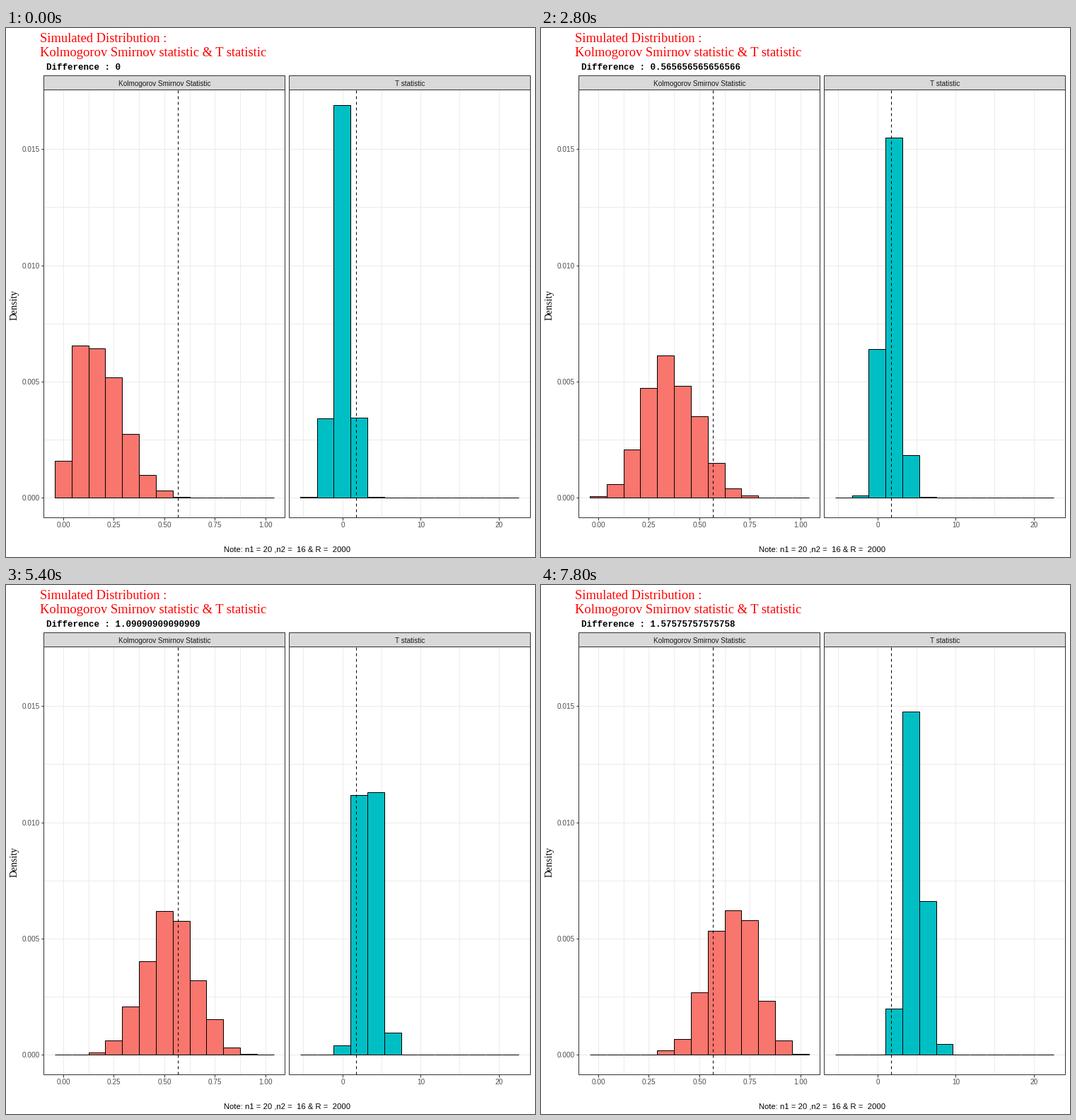
These frames come from a looping animation (748 by 748 pixels, 8 s). A matplotlib script:

```python
import numpy as np
import matplotlib.pyplot as plt
from matplotlib.animation import FuncAnimation
from matplotlib.patches import Rectangle

SIZE, DPI = 748, 100
FRAMES, STEP_MS = 40, 200
PT = 72 / DPI                   # points per pixel
BASE, Y_STEP = 664.5, 164.25    # zero line, pixels per 0.005 density
BIN_PX, BINS = 23.81, 13
UNIT = 782.3                    # pixel height of a bar holding every sample
STRIP, TOP, BOTTOM = 67, 87, 692
EDGE, GRID = "#333333", "#EBEBEB"

# Two normal samples; the second is shifted by the difference
N1, N2, REPS = 20, 16, 10000
rng = np.random.default_rng(7)
X = rng.standard_normal((REPS, N1))
Y = rng.standard_normal((REPS, N2))


def ks_stat(d):
    """One-sided two-sample statistic, max of F_x - F_y."""
    order = np.argsort(np.hstack([X, Y + d]), axis=1)
    gaps = np.where(order < N1, N2, -N1).cumsum(axis=1)
    return gaps.max(axis=1) / (N1 * N2)


def t_stat(d):
    """Student statistic with pooled variance."""
    pooled = (X.var(axis=1) * N1 + Y.var(axis=1) * N2) / (N1 + N2 - 2)
    error = np.sqrt(pooled * (1 / N1 + 1 / N2))
    return (Y.mean(axis=1) + d - X.mean(axis=1)) / error


def bar_heights(values, first, width):
    """Bar heights for right-closed bins centred on multiples of width."""
    edges = (np.arange(BINS + 1) + first - 0.5) * width + 1e-9
    share = np.histogram(values, edges)[0] / REPS
    return np.round(share * UNIT)


shifts = np.arange(FRAMES) * 4 / 99
ks_heights = [bar_heights(ks_stat(d), 0, 1 / 12) for d in shifts]
t_heights = [bar_heights(t_stat(d), -2, 2.154) for d in shifts]

fig = plt.figure(figsize=(SIZE / DPI, SIZE / DPI), dpi=DPI, facecolor="white")
ax = fig.add_axes([0, 0, 1, 1])
ax.set_xlim(0, SIZE)
ax.set_ylim(SIZE, 0)
ax.axis("off")


# Whole coordinates snap to the centre of that pixel
def line(x0, y0, x1, y1, color, z, **kw):
    ax.plot(np.floor([x0, x1]), np.floor([y0, y1]), color=color, lw=PT,
            zorder=z, snap=True, solid_capstyle="butt",
            dash_capstyle="butt", **kw)


def box(x0, y0, x1, y1, face, edge, z):
    patch = Rectangle((x0, y0), x1 - x0, y1 - y0, facecolor=face,
                      edgecolor=edge, lw=PT, zorder=z, snap=True)
    return ax.add_patch(patch)


def text(x, y, s, px, color="black", font="Liberation Sans", ha="left", **kw):
    kw.setdefault("va", "baseline")
    return ax.text(x, y, s, fontsize=px * PT, color=color, family=font,
                   ha=ha, zorder=9, **kw)


def panel(left, right, title, ticks, minor, start, fill, cut):
    """Draw one facet and return its bars."""
    for k in range(8):
        y = BASE - k * Y_STEP / 2
        line(left, y, right, y, GRID, 1)
    for x in minor + [x for x, _ in ticks]:
        line(x, TOP, x, BOTTOM, GRID, 1)
    for x, label in ticks:
        line(x, BOTTOM, x, BOTTOM + 4, EDGE, 2)
        text(x, 706.3, label, 10, "#4D4D4D", ha="center")
    edges = np.floor(start + BIN_PX * np.arange(BINS + 1))
    base = np.floor(BASE)
    bars = [box(a, base, b, base, fill, "black", 3)
            for a, b in zip(edges, edges[1:])]
    line(cut, BOTTOM, cut, TOP, "black", 4, ls=(0, (4, 4)))
    box(left, TOP, right, BOTTOM, "none", EDGE, 5)
    box(left, STRIP, right, TOP, "#D9D9D9", EDGE, 6)
    text((left + right + 1) / 2, 82, title, 10.05, "#1A1A1A", ha="center")
    return bars


ks_ticks = [(81.45 + 3 * BIN_PX * k, f"{k / 4:.2f}") for k in range(5)]
ks_minor = [81.45 + 3 * BIN_PX * (k + 0.5) for k in range(4)]
t_ticks = [(476 + 110.5 * k, str(10 * k)) for k in range(3)]
t_minor = [476 + 110.5 * (k - 0.5) for k in range(3)]

ks_bars = panel(53, 394, "Kolmogorov Smirnov Statistic", ks_ticks,
                ks_minor, 69.55, "#F8766D", 243)
t_bars = panel(400, 741, "T statistic", t_ticks,
               t_minor, 416.25, "#00BFC4", 495)

for k in range(4):
    y = np.floor(BASE - k * Y_STEP)
    line(50, y, 53, y, EDGE, 2)
    text(48, y + 4.3, f"{k * 0.005:.3f}", 10, "#4D4D4D", ha="right")

serif = "Liberation Serif"
text(48.5, 20, "Simulated Distribution :", 18.45, "red", serif)
text(48.5, 40, "Kolmogorov Smirnov statistic & T statistic", 18.45, "red", serif)
text(12.5, 391, "Density", 13.8, font=serif, ha="center", va="center", rotation=90)
text(397.5, 741, "Note: n1 = 20 ,n2 =  16 & R =  2000", 11.2, ha="center")
subtitle = text(57.5, 59, "", 12.5, font="Liberation Mono", weight="bold")


def draw(i):
    subtitle.set_text(f"Difference : {shifts[i]:.15g}")
    for bars, heights in ((ks_bars, ks_heights[i]), (t_bars, t_heights[i])):
        for bar, h in zip(bars, heights):
            bar.set_y(np.floor(BASE) - h)
            bar.set_height(h)


anim = FuncAnimation(fig, draw, frames=FRAMES, interval=STEP_MS,
                     init_func=lambda: draw(0), repeat=True, repeat_delay=0)
plt.show()
```
